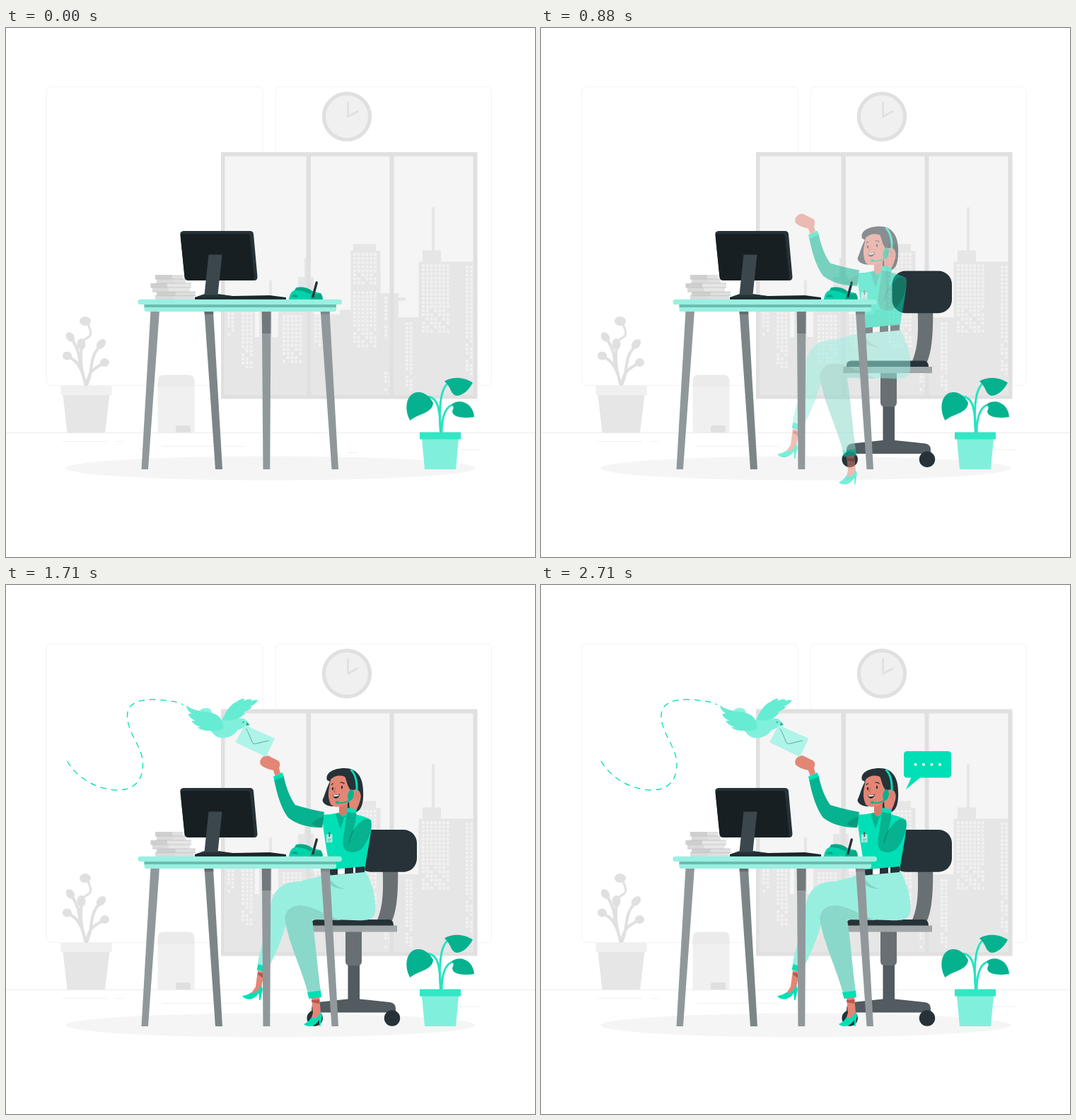
Recreate the animation shown at these times as an HTML page. Size 748 by 748 pixels, loop 2750 ms.

```html
<!DOCTYPE html>
<html lang="en">
<head>
<meta charset="utf-8">
<title>Office desk</title>
<style>
html, body { margin: 0; width: 100%; height: 100%; overflow: hidden; background: #fff; }
svg { display: block; width: 100vw; height: 100vh; }
</style>
</head>
<body>
<svg viewBox="0 0 748 748" xmlns="http://www.w3.org/2000/svg">
  <!-- walls and floor -->
  <g fill="none" stroke="#f3f3f3">
    <rect x="57.5" y="83" width="305.5" height="422.5" rx="7"/>
    <rect x="381" y="83" width="305.5" height="422.5" rx="7"/>
    <path d="M0 572.3H748" stroke="#ececec"/>
    <path d="M80 584.5H143M156 584.5H166M220 591.5H336M483 600.5H497M640 596H672" stroke="#f0f0f0"/>
  </g>
  <!-- clock -->
  <circle cx="482" cy="125.3" r="35.2" fill="#e0e0e0"/>
  <circle cx="482" cy="125.3" r="30" fill="#f0f0f0"/>
  <path d="M483.5 105V125.500L497 118" fill="none" stroke="#e0e0e0" stroke-width="2.6" stroke-linecap="round" stroke-linejoin="round"/>
  <!-- window and skyline -->
  <path d="M304 175.500H666.500V524.500H304Z" fill="#e0e0e0"/>
  <path d="M309.500 181.500H660.500V518.500H309.500Z" fill="#f5f5f5"/>
  <path d="M309.500 518.500V384H352V437H358V384H372V357H376V437H385V384H413V352H422V325H426V352H435V405H472V398.500H487.500V315H491V305.500H523V315H529.500V375H555V381H565V386H555V409H583.500V330.500H589V314.500H602V253.500H606V314.500H615V330.500H660.500V518.500Z" fill="#e6e6e6"/>
  <path id="lights" fill="#f1f1f1"/>
  <path d="M424.500 181H431V519H424.500ZM542.500 181H548.500V519H542.500Z" fill="#e0e0e0"/>
  <!-- grey plant -->
  <g fill="#e0e0e0">
    <g fill="none" stroke="#e0e0e0" stroke-width="4" stroke-linecap="round">
      <path d="M113 506C107 485 104 470 107 450M113 506C108 480 99 468 87 465M114 506C117 482 126 482 139 473M115 503C124 484 116 466 134 449M104 476C105 460 99 448 92 438" />
      <path d="M108 452C104 435 124 442 119 427C117 421 116 417 112 415" stroke-width="3"/>
    </g>
    <ellipse cx="112" cy="414.500" rx="8" ry="6.500"/>
    <ellipse cx="91" cy="437" rx="5.500" ry="7.500" transform="rotate(-35 91 437)"/>
    <ellipse cx="106.500" cy="447" rx="6" ry="8"/>
    <ellipse cx="134.500" cy="447" rx="5.500" ry="8" transform="rotate(42 134.500 447)"/>
    <ellipse cx="86.500" cy="463.500" rx="6.500" ry="6"/>
    <ellipse cx="139.500" cy="473" rx="6.500" ry="6"/>
  </g>
  <path d="M77.500 506H149.500V519H77.500Z" fill="#f0f0f0"/>
  <path d="M80.500 519H146.500L140 572H86.500Z" fill="#e6e6e6"/>
  <!-- bin -->
  <path d="M214.500 502H266.500V572H214.500Z" fill="#f0f0f0"/>
  <path d="M214.500 508V499Q214.500 490.500 223 490.500H258Q266.500 490.500 266.500 499V508Z" fill="#ebebeb"/>
  <path d="M240 572V565Q240 562 243 562H258Q261 562 261 565V572Z" fill="#e0e0e0"/>
  <ellipse cx="374" cy="622.500" rx="290" ry="17" fill="#f5f5f5"/>
  <!-- green plant -->
  <g fill="none" stroke="#26e3c0" stroke-width="3">
    <path d="M615 572C614 545 612 522 597 521.500"/>
    <path d="M614.500 572C612 545 613 513 624 503"/>
    <path d="M616 572C616 548 623 533 633 533"/>
  </g>
  <g fill="#05b290">
    <path d="M571.500 555C563 541 565 519 579 515.500C591 513 599 521 604 530C603 545 583 545 571.500 555Z"/>
    <path d="M620 499.500C632 492 649 494 660 501.500C654 513 645 520 637 520C628 518 630 508 620 499.500Z"/>
    <path d="M630 532C641 523 661 530 662 550C648 552 634 551 631.500 544C630 539 636 538 630 532Z"/>
  </g>
  <path d="M588 581H640L636 624H592Z" fill="#80f0dc"/>
  <path d="M585 571.500H643V581.500H585Z" fill="#33e6c4"/>

  <g id="chair">
    <path d="M532.500 398H554C555 436 552 463 545 476H524C533 456 534 435 532.500 398Z" fill="#687074"/>
    <rect x="496.500" y="346" width="84.500" height="59.700" rx="19" fill="#263238"/>
    <path d="M483.500 530H500V592H483.500Z" fill="#515b60"/>
    <path d="M480 489H503V532Q503 538 497 538H486Q480 538 480 532Z" fill="#687074"/>
    <path d="M432 604.500V599Q432 591 440 590L483 585.500H500L543 590Q551 591 551 599V604.500Z" fill="#515b60"/>
    <circle cx="436.700" cy="612.500" r="11.200" fill="#263238"/>
    <circle cx="546" cy="612.500" r="11.200" fill="#263238"/>
    <path d="M432 482V479Q432 473 439 473H541Q548 473 548 482Z" fill="#263238"/>
    <path d="M427.500 481.500H553V490.500H427.500Z" fill="#a0a5a7"/>
  </g>

  <!-- things on the desk -->
  <g>
    <path d="M211 349H250V355H211ZM213 355H254V361H213Z" fill="#e0e0e0"/>
    <path d="M204.500 361H262V367H204.500ZM207 367H260V373H207Z" fill="#e6e6e6"/>
    <path d="M213 373H268V378.500H213ZM211 378.500H266V384H211Z" fill="#dedede"/>
    <path d="M211 349H235V355H211ZM204.500 361H228V367H204.500ZM213 373H240V378.500H213Z" fill="#cfcfcf"/>
    <path d="M213 355H236V361H213ZM207 367H230V373H207ZM211 378.500H238V384H211Z" fill="#dadada"/>
    <path d="M211 355H254M211 361H262M205 367H262M207 373H268M211 378.500H268" stroke="#c4c4c4" stroke-width=".9"/>
  </g>
  <path d="M400 384C401 376 404 372 408 371L410 367Q423 365 433 372L445 375Q448 379 448 384Z" fill="#00d3ab"/>
  <path d="M408 371L411 367Q424 365 433 372L431 377Q420 370 408 371ZM432 377L445 375Q448 379 448 384H430Z" fill="#05a887"/>
  <path d="M403 380L406 377H411L413 381Z" fill="#05a887"/>
  <path d="M434 379.500L439.300 360" stroke="#263238" stroke-width="3.400" stroke-linecap="round"/>
  <path d="M252 287H345Q349.500 287 350 291.500L355.500 352Q355.500 357 351 357H258Q253 357 252.500 352L246.300 292Q246 287 252 287Z" fill="#263238"/>
  <path d="M250 291H341Q344.500 291 345 294.500L351 353Q351 356.500 348 356.500H258Q253 356.500 252.500 352L247 295Q247 291 250 291Z" fill="#171f22"/>
  <path d="M267 384V381L280 376.500H302L321 379L373 378L396 381V384Z" fill="#1c2427"/>
  <path d="M267 381L280 376.500H302L320 379.500L300 381.500Z" fill="#263238"/>
  <path d="M286.500 320.500H305.500L299.500 377.500H280.500Z" fill="#3c474d"/>

  <g id="woman">
    <!-- far foot, near foot -->
    <g fill="#e38676">
      <path d="M356 545L365 547L361 570Q350 580 345 580L353 568Z"/>
      <path d="M432 583L443 582L445 605Q437 619 430 618L434 605Z"/>
    </g>
    <path d="M356 548L364.500 549L363.500 556L356.500 551ZM432 587L443.500 586L443 592L432.500 590Z" fill="#b9574c"/>
    <g fill="#00dfb5">
      <path d="M334 581Q342 580 347 576Q354 580 361 566L363 572L359.500 587H358L357.500 577Q350 588 340 585Q336 584 334 581Z"/>
      <path d="M421 621Q429 617 432 611Q438 616 445 604Q448 609 446 613L444.500 624H443V615Q437 624 429 624Q424 624 421 621Z"/>
    </g>
    <!-- trousers -->
    <path d="M458 408L508 404C518 422 524 444 522 462C520 474 510 475 492 474L432 472L397 476C391 500 380 525 369 545L355 541C358 515 370 490 374 457C376 434 388 419 416 419Z" fill="#98efe0"/>
    <path d="M474 474C454 468 434 453 415 453C400 454 394 463 394.500 473C399 505 417 540 427 577L445 575C440 540 438 505 433 473Z" fill="#8ad8c9"/>
    <path d="M459 417Q466 427 480 430Q464 429 459 424Z" fill="#7fd5c5"/>
    <path d="M357 536L371 541L368 548L354.500 544ZM426 576L445 573.500L446 583L428.500 585Z" fill="#00dfb5"/>
    <!-- hair behind the face -->
    <path d="M454 276C451 265 464 259 479 259C496 259 505 272 505 291C506 306 503 319 495 321C484 322 475 319 473 313L460 313C453 312 448 309 447.500 304C451 297 453 287 458 278Z" fill="#263238"/>
    <path d="M471 304H483V322Q480 330 475 330Q470 327 471 322Z" fill="#d87869"/>
    <!-- shirt -->
    <path d="M447 325Q459 325 470 322L475 327L483 322Q506 326 516 332C519 342 512 370 507 404L458 406C455 380 449 355 447 325Z" fill="#00dfb5"/>
    <path d="M379 275L392.500 270C396 286 402 302 409 311Q428 317 450 321L447 343C430 344 410 338 399 329C389 316 383 295 379 275Z" fill="#06b28f"/>
    <path d="M449 328Q442 328 432 338Q439 342 447 343Z" fill="#099a7c"/>
    <path d="M378 271L390.500 265L393 271L379.500 276.500Z" fill="#00dfb5"/>
    <path d="M360 247Q364 240 371 241.500L385 248.500Q389 252 386 259L388 266L380.500 270L378 262Q367 260 361 255Q358 252 360 247Z" fill="#e38676"/>
    <path d="M466 324L473 345L478 329L484 324L476 328L470 322Z" fill="#06b28f"/>
    <path d="M457.500 402.500L507 398V406L458.500 410.500Z" fill="#263238"/>
    <path d="M469 401.500L479 400.500V408.500L469 409.500ZM491 399.500L494 399.200V407.200L491 407.500Z" fill="#fff"/>
    <path d="M453 352.500H461.500V364H453Z" fill="#a7eee2"/>
    <path d="M455 359.500H460M455 362H459" stroke="#5aa99b" stroke-width=".9"/>
    <path d="M457.300 349V356" stroke="#47625f" stroke-width="1.800"/>
    <!-- face -->
    <path d="M459 275Q469 266 481 272L489 289Q490 306 479 311Q466 317 459 310Q454 299 457 286Z" fill="#e38676"/>
    <path d="M457 279C460 268 469 265 476 265C482 272 481 285 489 292L496 269L479 261L458 270Z" fill="#263238"/>
    <ellipse cx="462" cy="288" rx="1.200" ry="2.200" fill="#263238"/>
    <ellipse cx="475" cy="286" rx="1.200" ry="2.200" fill="#263238"/>
    <path d="M459.500 282.500L463 280.500M472.500 279.500Q476 278.500 478.500 281" fill="none" stroke="#263238" stroke-width="1.200"/>
    <path d="M466 286L463.500 292.500L466.500 293" fill="none" stroke="#c5604f" stroke-width="1"/>
    <path d="M462 296.500Q467 298 472 295Q471 302 466 302Q463 301 462 296.500Z" fill="#263238"/>
    <path d="M463 297Q467 298 471 296L470 298.300Q466 299.500 463.500 298.800Z" fill="#fff"/>
    <!-- raised hand, headset, bent arm -->
    <path d="M487 292Q493 287 499 291Q503 296 501 304Q499 312 495 319L486 318Q484 304 487 292Z" fill="#e38676"/>
    <path d="M495 293L494 302M499 294L497 304" stroke="#c96c5d" stroke-width=".8"/>
    <path d="M487.500 261Q497 270 496 291" fill="none" stroke="#00dfb5" stroke-width="3"/>
    <ellipse cx="487.500" cy="297" rx="4.200" ry="8" transform="rotate(10 487.500 297)" fill="#06b28f"/>
    <path d="M486 303Q482 309 469 308" fill="none" stroke="#06b28f" stroke-width="1.700"/>
    <ellipse cx="468.500" cy="307.500" rx="2.600" ry="1.900" fill="#06b28f"/>
    <path d="M482.500 320L495 321C496 330 493 340 491 347Q500 334 507 331Q513 330 516 334C519 344 511 364 503 373Q491 382 480 375Q474 368 478 350Z" fill="#06b28f"/>
    <path d="M491 347Q487 355 485 365Q487 355 491 347Z" stroke="#058d71" stroke-width="1"/>
    <path d="M482.500 315L496 317L495 323L481.500 321Z" fill="#00dfb5"/>
  </g>

  <!-- desk -->
  <path d="M204.500 400H217L201 624H191.500Z" fill="#90989b"/>
  <path d="M280.500 400H293L306 624H296Z" fill="#7c8688"/>
  <path d="M280.500 400H293L293.300 405H280.800Z" fill="#626c6f"/>
  <path d="M361.800 400H374.500L373.300 624H363.500Z" fill="#90989b"/>
  <path d="M361.800 400H374.500L374.300 432H362.100Z" fill="#72797c"/>
  <path d="M444.800 400H457.500L470 624H460.500Z" fill="#90989b"/>
  <path d="M444.800 400H457.500L457.800 405H445.100Z" fill="#7f888b"/>
  <path d="M195.500 390H467V398Q467 401 464 401H198.500Q195.500 401 195.500 398Z" fill="#99f0e1"/>
  <path d="M195.500 390H467V395H195.500Z" fill="#6bbdb0"/>
  <rect x="186.500" y="383.700" width="288.500" height="7.300" rx="3.500" fill="#99f0e1"/>

  <g id="bird">
    <path d="M85 249C100 275 130 290 157 290C185 290 197 268 190 240C184 221 170 205 170 185C170 168 185 161 210 162C228 163 240 165 249 169" fill="none" stroke="#00dfb5" stroke-width="1.300" stroke-dasharray="8.500 6.800"/>
    <path d="M336 198L378.500 217L366 243L323 222.500Z" fill="#aef4e8"/>
    <path d="M338 203Q343 212 346 221Q348 226 353 224L370 220" fill="none" stroke="#62a99c" stroke-width="1"/>
    <path d="M272 177Q281 171 288 176Q291 182 292 190L303 198L289 203Q285 182 272 177Z" fill="#8df1df"/>
    <path d="M303 193C309 179 316 168 325 165Q331 160 336 161Q335 164 332 165Q341 160 346 162Q345 165 341 166Q349 161 355 163Q351 169 343 172L347 172Q341 178 334 180L337 181Q329 189 320 192Z" fill="#66ecd3"/>
    <path d="M286 196Q299 189 318 192Q326 187 334 189Q340 191 342 197L337 198Q334 203 326 205C321 213 312 217 301 216Q292 214 288 205Z" fill="#80f0dc"/>
    <path d="M253 170Q263 178 280 179Q300 181 304 193Q307 200 305 204Q296 208 285 206Q274 206 269 201L274 201Q264 198 261 192L266 192Q257 187 256 182L261 182Q254 177 253 170Z" fill="#66ecd3"/>
    <circle cx="334" cy="194" r="1" fill="#2c8a79"/>
    <path d="M339 194L343 198L338 199Z" fill="#06b28f"/>
  </g>

  <g id="bubble">
    <path d="M518 235H575Q580 235 580 240V267.500Q580 272.500 575 272.500H536L516 289L523.500 272.500H518Q513 272.500 513 267.500V240Q513 235 518 235Z" fill="#00dfb5"/>
    <path d="M529.500 253.700h.01M541 253.700h.01M552.500 253.700h.01M564 253.700h.01" stroke="#fff" stroke-width="4" stroke-linecap="round"/>
  </g>
</svg>
<script>
const LOOP = 2750, FPS = 24, SHIFT = 45;
const $ = id => document.getElementById(id);

// lit windows: x, y, columns, rows
const blocks = [
  [313, 402, 2, 6], [333, 402, 3, 14], [391, 406, 5, 12], [436, 406, 3, 8],
  [491, 318, 6, 8], [491, 372, 6, 14], [535, 380, 1, 10], [535, 486, 2, 5],
  [565, 416, 2, 17], [588, 334, 7, 17], [650, 336, 2, 27]
];
$("lights").setAttribute("d", blocks.map(([x, y, cols, rows], b) => {
  let d = "";
  for (let r = 0; r < rows; r++)
    for (let c = 0; c < cols; c++)
      if (r < rows * 0.6 || (r * 3 + c * 5 + b) % 4)
        d += `M${x + c * 5.8} ${y + r * 5.8}h4v4h-4z`;
  return d;
}).join(""));

const bez = (s, a, b) => 3 * (1 - s) * (1 - s) * s * a + 3 * (1 - s) * s * s * b + s * s * s;

// cubic-bezier(.36, -.01, .5, 1.38)
function ease(x) {
  if (x <= 0) return 0;
  if (x >= 1) return 1;
  let lo = 0, hi = 1;
  for (let i = 0; i < 24; i++) {
    const mid = (lo + hi) / 2;
    if (bez(mid, 0.36, 0.5) < x) lo = mid; else hi = mid;
  }
  return bez(lo, -0.01, 1.38);
}

function place(id, p, transform) {
  const el = $(id);
  el.setAttribute("opacity", Math.max(0, Math.min(1, p)));
  el.setAttribute("transform", transform);
}

function draw(ms) {
  const step = Math.floor((ms % LOOP + 5) * FPS / 1000);
  const t = step * 1000 / FPS + 18;
  const grow = start => ease((t - start) / 1000);

  const chair = step < 4 ? 0 : grow(0);
  const woman = grow(500), bird = grow(1000), bubble = grow(1700);
  place("chair", chair, `translate(0 ${(1 - chair) * SHIFT})`);
  place("woman", woman, `translate(0 ${(1 - woman) * SHIFT})`);
  place("bird", bird, `translate(${(bird - 1) * SHIFT} 0)`);
  place("bubble", bubble,
    `translate(546.5 262) scale(${0.5 + bubble / 2}) translate(-546.5 -262)`);
}

let begin;
function tick(now) {
  begin ??= now;
  draw(now - begin);
  requestAnimationFrame(tick);
}
draw(0);
requestAnimationFrame(tick);
</script>
</body>
</html>
```
